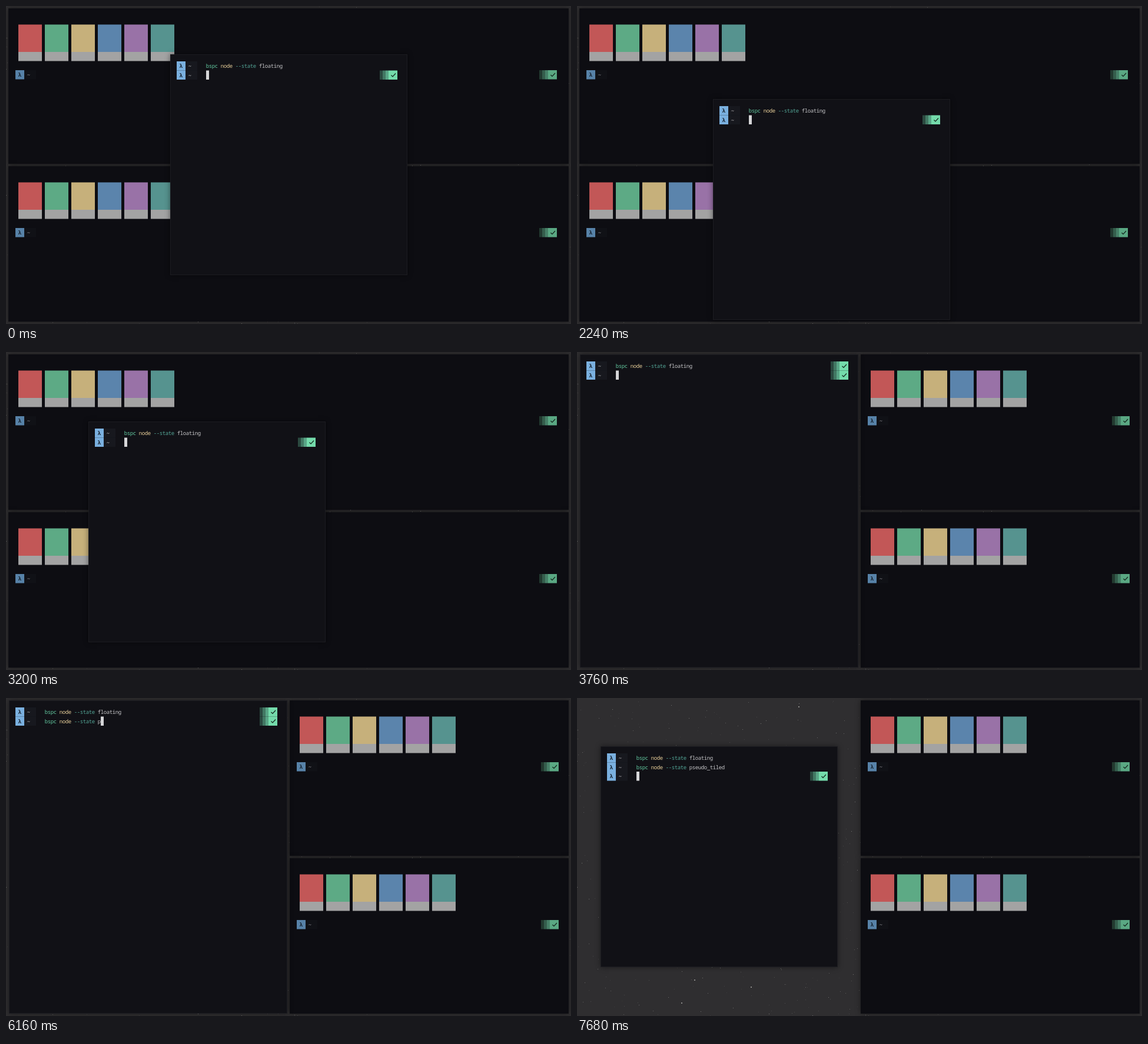
An HTML page with a canvas for the animation above (8 s loop, 960 by 540 pixels).

```html
<!DOCTYPE html>
<html lang="en">
<head>
<meta charset="utf-8">
<title>Tiling window states</title>
<style>
  html, body { margin: 0; width: 100%; height: 100%; overflow: hidden; background: #2f2e30; }
  canvas { display: block; }
</style>
</head>
<body>
<canvas id="stage" width="960" height="540"></canvas>
<script>
const LOOP = 8000, STEP = 40;
const CELL = 5, ROW = 15.5;
const ctx = document.getElementById('stage').getContext('2d');

const SWATCHES = ['#c25757', '#5daa85', '#c6b07b', '#5b84ac', '#9972a7', '#56938f'];
const ACTIVE = {
  bg: '#111116', badge: '#7ab0df', path: '#17181e', text: '#c8c8ca',
  ok: ['#2b4a40', '#427863', '#59a586', '#74dbab']
};
const IDLE = {
  bg: '#0d0d12', badge: '#5782a8', path: '#101116', text: '#97979b',
  ok: ['#22392f', '#345d4c', '#467f67', '#5aa883']
};
const WORD_COLORS = ['#63c9a0', '#e6cd98', '#53a596', '#c4c4c6'];

// Dragging the floating window: time, left, top
const DRAG = [
  [1040, 279, 82], [1200, 296, 84], [1340, 307, 92], [1480, 262, 102],
  [1600, 190, 116], [1720, 88, 150], [1800, 66, 164], [1880, 72, 160],
  [2000, 172, 118], [2120, 284, 112], [2240, 231, 158], [2340, 184, 150],
  [2440, 204, 104], [2540, 264, 84], [2640, 320, 108], [2720, 331, 136],
  [2840, 290, 162], [3000, 190, 158], [3140, 140, 128], [3280, 150, 108],
  [3400, 156, 106]
];

function rng(seed) {
  return () => {
    seed = (seed * 1664525 + 1013904223) >>> 0;
    return seed / 4294967296;
  };
}

function makeWallpaper() {
  const c = document.createElement('canvas');
  c.width = 960;
  c.height = 540;
  const g = c.getContext('2d'), rand = rng(41);
  g.fillStyle = '#2f2e30';
  g.fillRect(0, 0, 960, 540);
  for (let i = 0; i < 900; i++) {
    const big = rand() > 0.97, size = big ? 2 : 1;
    g.fillStyle = `rgba(200,200,195,${big ? 0.6 : 0.08 + 0.4 * rand() ** 2})`;
    g.fillRect(Math.floor(rand() * 960), Math.floor(rand() * 540), size, size);
  }
  return c;
}
const wallpaper = makeWallpaper();

function spline(a, b, c, d, u) {
  return b + 0.5 * u * (c - a + u * (2 * a - 5 * b + 4 * c - d + u * (3 * (b - c) + d - a)));
}

function dragAt(t) {
  const last = DRAG.length - 1;
  if (t <= DRAG[0][0]) return DRAG[0].slice(1);
  if (t >= DRAG[last][0]) return DRAG[last].slice(1);
  const i = DRAG.findIndex(k => k[0] > t) - 1;
  const at = n => DRAG[Math.max(0, Math.min(last, n))];
  const u = (t - at(i)[0]) / (at(i + 1)[0] - at(i)[0]);
  return [1, 2].map(n => Math.round(spline(at(i - 1)[n], at(i)[n], at(i + 1)[n], at(i + 2)[n], u)));
}

function rect(x, y, w, h, color) {
  ctx.fillStyle = color;
  ctx.fillRect(x, y, w, h);
}

function frame(x, y, w, h, color) {
  ctx.save();
  ctx.shadowColor = 'rgba(0,0,0,.45)';
  ctx.shadowBlur = 9;
  rect(x, y, w, h, color);
  ctx.restore();
}

function glyphs(text, x, y, color, font = '9px "Noto Sans Mono", monospace') {
  ctx.font = font;
  ctx.textAlign = 'center';
  ctx.fillStyle = color;
  [...text].forEach((ch, i) => ctx.fillText(ch, x + (i + 0.5) * CELL, y));
}

function prompt(x, y, theme) {
  rect(x, y, 15, ROW, theme.badge);
  rect(x + 15, y, 20, ROW, theme.path);
  glyphs('λ', x + 5, y + 11, '#14202c', 'bold 9px "Noto Sans Mono", monospace');
  glyphs('~', x + 20, y + 11, theme.text);
}

function okMark(x, y, theme) {
  theme.ok.forEach((color, i) => rect(x + i * 5, y, i < 3 ? 5 : 15, ROW, color));
  ctx.strokeStyle = '#12241c';
  ctx.lineWidth = 1.2;
  ctx.beginPath();
  ctx.moveTo(x + 19.5, y + 8);
  ctx.lineTo(x + 22, y + 10.5);
  ctx.lineTo(x + 27, y + 5);
  ctx.stroke();
}

function command(text, x, y) {
  let col = 0;
  text.split(' ').forEach((word, i) => {
    glyphs(word, x + col * CELL, y + 11, WORD_COLORS[i]);
    col += word.length + 1;
  });
}

function paletteWindow(x, y, w, okX) {
  frame(x, y, w, 264, IDLE.bg);
  SWATCHES.forEach((color, i) => {
    const sx = x + 17 + i * 45;
    rect(sx, y + 27.5, 40, 46.5, color);
    rect(sx, y + 74, 40, 15.5, '#a3a3a3');
  });
  prompt(x + 12, y + 105, IDLE);
  okMark(okX, y + 105, IDLE);
}

function terminal(x, y, w, h, lines, okX, okRows) {
  frame(x, y, w, h, ACTIVE.bg);
  ctx.strokeStyle = '#1c1c21';
  ctx.lineWidth = 1;
  ctx.strokeRect(x + 0.5, y + 0.5, w - 1, h - 1);
  lines.forEach((line, i) => {
    const top = y + 12 + i * ROW;
    prompt(x + 11, top, ACTIVE);
    command(line, x + 61, top);
    if (okRows.includes(i)) okMark(x + okX, top, ACTIVE);
  });
  const n = lines.length - 1;
  rect(x + 61 + lines[n].length * CELL, y + 12 + n * ROW, CELL, ROW, '#d6d6d8');
}

const BASE = 'bspc node --state ';
const FIRST = BASE + 'floating';
const FINAL = BASE + 'pseudo_tiled';

function typedAt(t) {
  if (t < 4600) return '';
  if (t < 6160) {
    const erased = Math.max(0, Math.min(8, Math.floor((t - 4600) / STEP)));
    return FIRST.slice(0, FIRST.length - erased);
  }
  if (t < 6320) return BASE + 'p';
  if (t < 6520) return BASE + 'ps';
  return FINAL;
}

function draw(t) {
  const tiled = t >= 3640;
  ctx.drawImage(wallpaper, 0, 0);
  const px = tiled ? 482 : 4, pw = tiled ? 474 : 952, okX = tiled ? 909 : 906;
  paletteWindow(px, 4, pw, okX);
  paletteWindow(px, 272, pw, okX);

  const lines = [FIRST, typedAt(t)];
  if (t >= 6920) lines.push('');
  if (!tiled) {
    const [x, y] = dragAt(t);
    terminal(x, y, 403, 375, lines, 356, [1]);
  } else if (t < 6960) {
    const okRows = t < 3720 ? [1] : [0, 1, 2];
    terminal(5, 4, 473, 532, lines, 426, okRows);
  } else {
    terminal(40, 82, 403, 375, lines, 356, [2]);
  }
}

const start = performance.now();
function tick() {
  const t = (performance.now() - start) % LOOP;
  draw(Math.floor(t / STEP) * STEP);
  requestAnimationFrame(tick);
}
tick();
</script>
</body>
</html>
```
